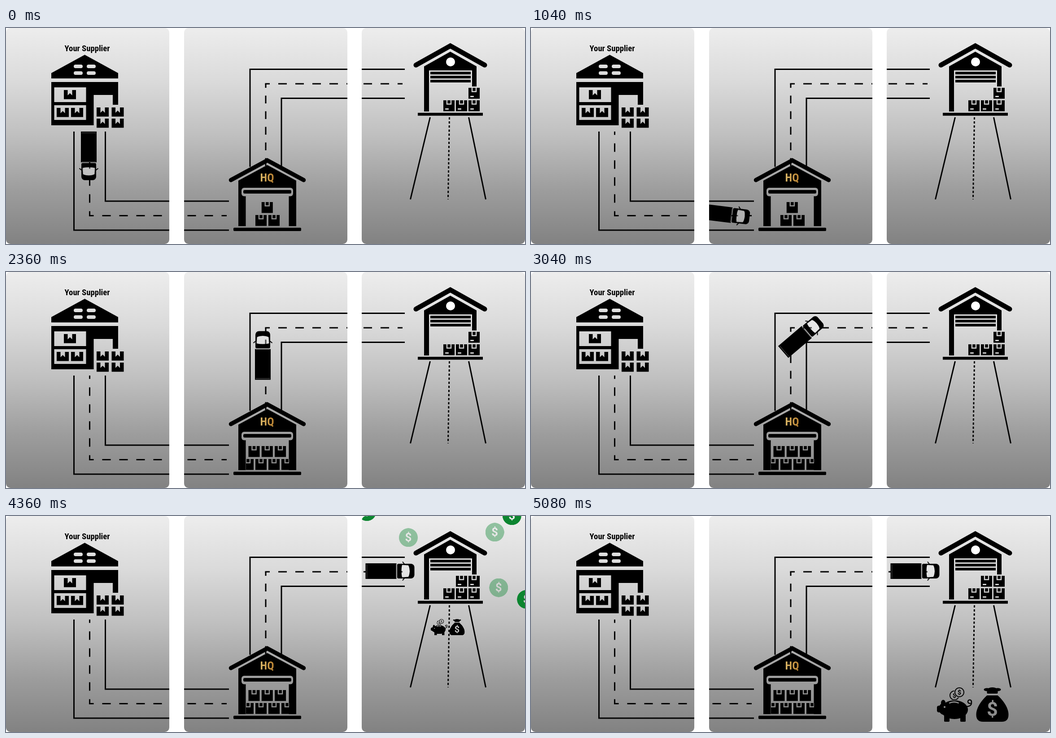
An HTML page with a canvas that plays this animation: 1157x484 px, repeating every 5.16 s.

```html
<!DOCTYPE html>
<html lang="en">
<head>
<meta charset="utf-8">
<title>Supply route</title>
<style>
  html, body { margin: 0; width: 100%; height: 100%; overflow: hidden; background: #fff; }
  canvas { display: block; }
</style>
</head>
<body>
<canvas id="stage" width="1157" height="484"></canvas>
<script>
const W = 1157, H = 484, LOOP = 5160, STEP = 40;
const NARROW = "'Roboto Condensed', Roboto, 'Open Sans', sans-serif";
const PLAIN = "Roboto, 'Open Sans', sans-serif";
const ctx = document.getElementById('stage').getContext('2d');

const bg = ctx.createLinearGradient(0, 0, 0, H);
['#ededed', '#dadada', '#bfbfbf', '#9d9d9d', '#828282']
  .forEach((c, i, all) => bg.addColorStop(i / (all.length - 1), c));

const clamp = v => Math.min(1, Math.max(0, v));
const ramp = (t, a, b) => clamp((t - a) / (b - a));
const ease = p => p < 0.5 ? 4 * p ** 3 : 1 - 4 * (1 - p) ** 3;
const mix = (a, b, p) => a + (b - a) * p;
const SIDES = [-1, 1];

function rect(x, y, w, h, fill = '#000', r = 0, c = ctx) {
  c.fillStyle = fill;
  c.beginPath();
  c.roundRect(x, y, w, h, r);
  c.fill();
}

function trace(pts) {
  ctx.beginPath();
  for (let i = 0; i < pts.length; i += 2) ctx.lineTo(pts[i], pts[i + 1]);
}

function poly(pts, fill = '#000') {
  trace(pts);
  ctx.fillStyle = fill;
  ctx.fill();
}

function line(pts, width = 3, color = '#000', dash = [], offset = 0) {
  trace(pts);
  ctx.setLineDash(dash);
  ctx.lineDashOffset = offset;
  ctx.lineWidth = width;
  ctx.strokeStyle = color;
  ctx.stroke();
  ctx.setLineDash([]);
}

function disc(c, x, y, rx, ry = rx) {
  c.beginPath();
  c.ellipse(x, y, rx, ry, 0, 0, 7);
  c.fill();
}

// Label centred on a point, at the largest size up to max that keeps to the room.
function label(text, x, y, room, max, fill) {
  const setFont = size => { ctx.font = `bold condensed ${size}px ${NARROW}`; };
  setFont(20);
  setFont(Math.min(max, 20 * room / ctx.measureText(text).width));
  ctx.textAlign = 'center';
  ctx.textBaseline = 'middle';
  ctx.fillStyle = fill;
  ctx.fillText(text, x, y);
}

function dollar(c, x, y, size) {
  c.font = `bold ${size}px ${PLAIN}`;
  c.textAlign = 'center';
  c.textBaseline = 'middle';
  c.fillText('$', x, y);
}

function sprite(w, h, draw) {
  const el = document.createElement('canvas');
  el.width = w * 2;
  el.height = h * 2;
  const c = el.getContext('2d');
  c.scale(2, 2);
  draw(c);
  return el;
}

const cut = c => { c.globalCompositeOperation = 'destination-out'; };
const keep = c => { c.globalCompositeOperation = 'source-over'; };

const coin = sprite(42, 42, c => {
  c.fillStyle = '#0c8530';
  disc(c, 21, 21, 21);
  cut(c);
  dollar(c, 21, 22, 26);
});

function pig(c) {
  disc(c, 39, 51, 30, 21);
  disc(c, 17, 49, 13, 14);
  disc(c, 14, 36, 5, 7);
  rect(0, 42, 12, 15, '#000', 4, c);
  for (const x of [16, 52]) rect(x, 60, 12, 18, '#000', 2, c);
  c.lineWidth = 2.5;
  c.beginPath();
  c.arc(73, 33, 4, 1, 6.5);
  c.quadraticCurveTo(78, 44, 64, 44);
  c.stroke();
  cut(c);
  disc(c, 17, 45, 2);
  c.beginPath();
  c.arc(38, 60, 26, -2, -1.15);
  c.stroke();
  for (const [x, y] of [[39, 19], [50, 12]]) {
    cut(c);
    disc(c, x, y, 12);
    keep(c);
    c.lineWidth = 2;
    c.beginPath();
    c.arc(x, y, 10, 0, 7);
    c.stroke();
    dollar(c, x, y + 1, 14);
  }
}

function bag(c) {
  c.save();
  c.translate(123.5, 0);
  disc(c, 0, 6, 11, 5);
  rect(-12, 6, 24, 9, '#000', 2, c);
  for (const s of SIDES) {
    disc(c, 12 * s, 6, 7, 3.5);
    c.beginPath();
    c.moveTo(0, 19);
    c.lineTo(12 * s, 19);
    c.bezierCurveTo(26 * s, 32, 36 * s, 48, 36 * s, 62);
    c.quadraticCurveTo(36 * s, 78, 21 * s, 78);
    c.lineTo(0, 78);
    c.fill();
  }
  rect(-1, 19, 2, 59, '#000', 0, c);
  cut(c);
  dollar(c, 0, 52, 43);
  c.restore();
}

const savings = sprite(162, 80, c => { pig(c); keep(c); bag(c); });

// Truck moves: start, end, x, y, heading in degrees.
const moves = [
  [40, 600, 213, 402, 38.5],
  [680, 1240, 482, 421, 0],
  [2040, 2360, 572.5, 187, -90],
  [2600, 3160, 605, 142, -38.5],
  [3160, 3600, 856, 123.5, 0]
];

function truckPose(t) {
  let pose = [184.5, 286.5, 90];
  for (const [a, b, ...to] of moves) {
    const p = ease(ramp(t, a, b));
    pose = pose.map((v, i) => mix(v, to[i], p));
  }
  return pose;
}

function truck(t) {
  const [x, y, deg] = truckPose(t);
  ctx.save();
  ctx.translate(x, y);
  ctx.rotate(deg * Math.PI / 180);
  rect(-54.5, -17.5, 69, 35);
  for (const seam of [-52, 13]) rect(seam, -16, 0.7, 32, '#777');
  // Cab with an open windscreen between two bowed edges
  ctx.beginPath();
  ctx.roundRect(16, -16.5, 38.5, 33, [3, 8, 8, 3]);
  ctx.moveTo(27, -14);
  ctx.quadraticCurveTo(24, 0, 27, 14);
  ctx.lineTo(41, 13);
  ctx.quadraticCurveTo(47, 0, 41, -13);
  ctx.fillStyle = '#000';
  ctx.fill('evenodd');
  rect(26, -12, 17, 24, 'rgba(255,255,255,.3)', 3);
  for (const s of SIDES) line([32, 16 * s, 28, 21 * s], 2);
  ctx.restore();
}

// Two kerbs and a dashed middle around one corner.
function bend(x, y, top, end, inner, dash, down, across) {
  for (const k of SIDES) {
    const cx = x + 35 * k, cy = y + 32.5 * k * inner;
    line([cx, top, cx, cy, end, cy]);
  }
  line([x, y, x, top], 3, '#000', [dash, dash], down);
  line([x - 1.5, y, end - 5, y], 3, '#000', [19, 19], across);
}

function roads() {
  bend(186.5, 420.5, 232, 497, -1, 19, 9, 8.5);
  bend(579, 125, 311, 889, 1, 17.5, 8.5, 8.5);
  for (const k of [-1, 0, 1]) {
    line([988.5 + 43 * k, 200, 985.5 + 84 * k, 384], 3, '#000', k ? [] : [5, 4.15]);
  }
}

// Wall with a pointed top, centred on x.
function gable(x, peak, half, eave, base) {
  poly([x, peak, x + half, eave, x + half, base, x - half, base, x - half, eave]);
}

function chevron(x, peak, half, drop, width) {
  ctx.lineCap = 'round';
  line([x - half, peak + drop, x, peak, x + half, peak + drop], width);
  ctx.lineCap = 'butt';
}

function row(n, x, y, pitch, draw) {
  for (let i = 0; i < n; i++) draw(x + pitch * i, y, i);
}

function parcel(x, y) {
  const mid = x + 13.5;
  rect(x, y, 27, 20.5);
  poly([mid - 5, y, mid + 5, y, mid + 5, y + 12, mid, y + 7, mid - 5, y + 12], bg);
}

function supplier() {
  label('Your Supplier', 181, 46.5, 101, 20.5, '#000');
  gable(175.5, 60, 74.5, 101, 113);
  for (const y of [82, 97]) row(2, 151, y, 29, (x, y) => rect(x, y, 20, 8, bg, 4));
  rect(101, 121, 149, 97);
  rect(195.5, 150, 42.5, 68, bg);
  rect(238, 172, 12, 46, bg);
  for (const y of [133, 173]) rect(107.5, y, 71, 33, bg);
  parcel(129, 139);
  row(2, 113, 179, 32, parcel);
  for (const y of [178, 203]) row(2, 202, y, 33.5, parcel);
}

function carton(x, y, alpha = 1, tag = false) {
  const l = x + 8, r = x + 17;
  ctx.globalAlpha = alpha;
  rect(x, y, 25, 24.5);
  line([l, y, l, y + 8.5, r, y + 8.5, r, y], 2.5, bg);
  if (tag) rect(x + 4, y + 18, 8, 3, bg, 1);
  ctx.globalAlpha = 1;
}

function headquarters(t) {
  chevron(582.5, 296.7, 81, 44, 9.5);
  gable(582.5, 307, 64.5, 342, 444);
  rect(534.5, 375, 96, 69, bg);
  rect(525, 358, 115, 19, bg, 6);
  rect(529, 363, 107, 8, '#000', 3);
  const gold = ctx.createLinearGradient(568, 0, 597, 0);
  gold.addColorStop(0, '#d9b565');
  gold.addColorStop(1, '#b98232');
  label('HQ', 582, 336, 31, 31, gold);
  const first = ramp(t, 1520, 1600), last = ramp(t, 1640, 1880);
  ctx.save();
  ctx.beginPath();
  ctx.rect(535, 380, 96, 64);
  ctx.clip();
  row(3, 540.5, 390, 29.3, (x, y, i) => carton(x, y, [first, 1, last][i]));
  row(4, 527, 419, 29, (x, y, i) => carton(x, y, i % 3 ? 1 : first));
  ctx.restore();
  rect(507, 447.5, 151, 7.5, '#000', 2);
}

function warehouse(t) {
  gable(990.5, 53, 58.5, 86, 187);
  rect(1039, 131, 10.5, 57, bg);
  rect(943, 95, 96, 93, bg);
  chevron(990.5, 40, 76.5, 43, 11);
  for (const y of [98, 107, 116]) rect(946, y, 90, 6);
  ctx.fillStyle = '#fff';
  disc(ctx, 991, 76, 10);
  const extra = ramp(t, 3360, 3600);
  row(3, 975, 162, 28, (x, y) => carton(x, y, 1, true));
  row(2, 1003, 134, 28, (x, y, i) => carton(x, y, i ? 1 : extra, true));
  rect(918, 190, 145, 6.5);
}

// Each source sends coins along one ray: x, y, angle, reach.
const rays = [[933, 71, -2.58, 151], [1059, 66, -0.77, 95], [1059, 144, 0.4, 109]];

function money(t) {
  const out = ease(ramp(t, 3720, 4280)), away = ease(ramp(t, 4280, 4840));
  const solid = ramp(t, 3400, 3600);
  const faint = t < 3760 ? 0 : 0.4 * (1 - ramp(t, 4400, 4680));
  const put = ([x, y, angle], dist, r, alpha) => {
    ctx.globalAlpha = alpha;
    ctx.drawImage(coin, x + dist * Math.cos(angle) - r, y + dist * Math.sin(angle) - r, 2 * r, 2 * r);
  };
  for (const ray of rays) {
    put(ray, ray[3] * out + 70 * away, mix(13, 21, out), solid);
    put(ray, mix(34, 42, out) + 50 * away, mix(15.5, 21, out), faint);
  }
  ctx.globalAlpha = 1;
}

function nestEgg(t) {
  if (t < 3760) return;
  const out = ease(ramp(t, 3720, 4280)), grow = ease(ramp(t, 4280, 4840));
  const s = mix(mix(0.315, 0.465, out), 1, grow);
  const y = mix(mix(200, 247, out), 422.5, grow);
  ctx.globalAlpha = mix(0.35, 1, ramp(t, 3760, 4040));
  ctx.drawImage(savings, 985 - 80 * s, y - 39.5 * s, 162 * s, 80 * s);
  ctx.globalAlpha = 1;
}

function draw(t) {
  ctx.fillStyle = '#fff';
  ctx.fillRect(0, 0, W, H);
  ctx.save();
  ctx.beginPath();
  row(3, 0, 0, 396.6, (x, y) => ctx.roundRect(Math.round(x), y, 364, H, 10));
  ctx.clip();
  ctx.fillStyle = bg;
  ctx.fillRect(0, 0, W, H);
  roads();
  truck(t);
  supplier();
  headquarters(t);
  nestEgg(t);
  warehouse(t);
  money(t);
  ctx.restore();
}

const begin = performance.now();
function tick() {
  const t = (performance.now() - begin) % LOOP;
  draw(Math.floor(t / STEP) * STEP);
  requestAnimationFrame(tick);
}
tick();
</script>
</body>
</html>
```
